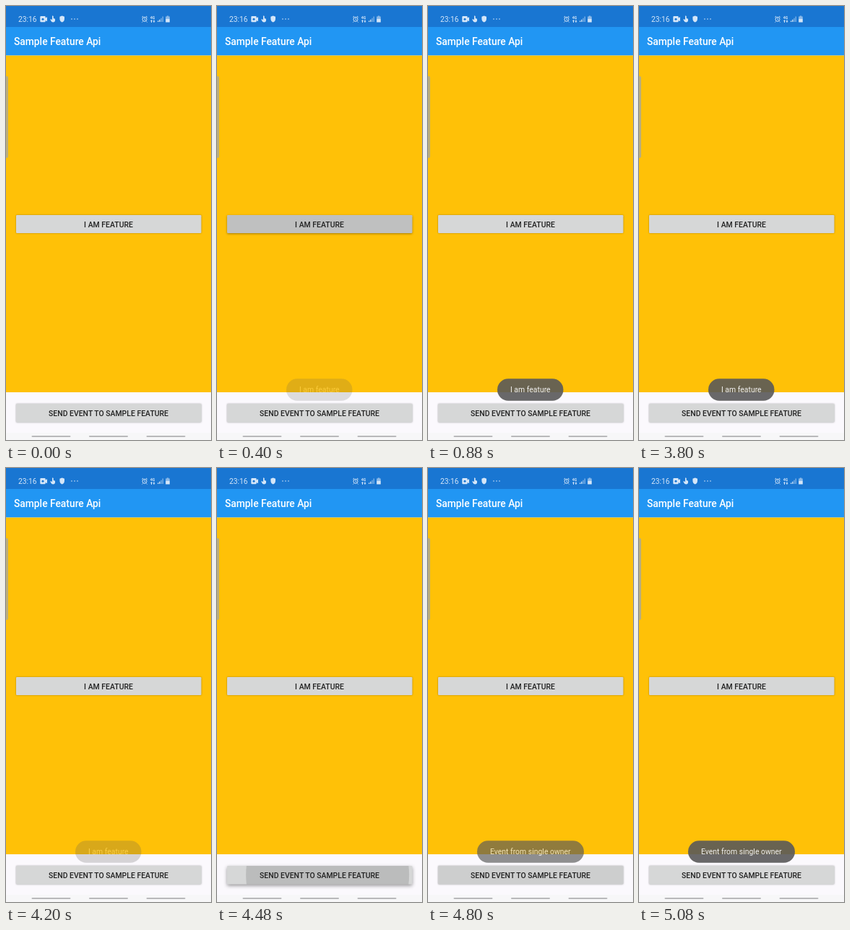
Write an HTML page that moves like this. It is 284 by 600 pixels and loops after 7280 ms.

```html
<!DOCTYPE html>
<html lang="en">
<head>
<meta charset="utf-8">
<title>Sample Feature Api</title>
<style>
html, body { margin: 0; width: 100%; height: 100%; overflow: hidden; }
svg { display: block; width: 284px; height: 600px; font: 10.45px Roboto, sans-serif; }
.label { font-weight: 500; fill: #222; text-anchor: middle; }
.toast rect { fill: #595959; fill-opacity: .9; }
.toast text { fill: #f2f2f2; text-anchor: middle; }
</style>
</head>
<body>
<svg viewBox="0 0 284 600">
  <defs>
    <clipPath id="clip0"><rect x="14" y="289" width="256.5" height="25" rx="1.3"/></clipPath>
    <clipPath id="clip1"><rect x="14" y="550" width="256.5" height="25.5" rx="1.3"/></clipPath>
  </defs>
  <rect width="284" height="600" fill="#fbf9fd"/>
  <rect width="284" height="29" fill="#1976d2"/>
  <rect y="29" width="284" height="39.5" fill="#2196f3"/>
  <rect y="68.5" width="284" height="465.5" fill="#ffc107"/>
  <rect y="590" width="284" height="10" fill="#f7f7f8"/>
  <rect x="-3" y="97" width="6" height="113" rx="2" fill="#bbae7b"/>
  <g fill="#b9b9bb">
    <rect x="35.5" y="594" width="54" height="2" rx="1"/>
    <rect x="115" y="594" width="54" height="2" rx="1"/>
    <rect x="194.5" y="594" width="54" height="2" rx="1"/>
  </g>

  <!-- status bar -->
  <g fill="#d5e6f8">
    <text x="17" y="22" font-size="10.3">23:16</text>
    <path d="M48.5 14h5q1.2 0 1.2 1.2v1.3l2.3-1.3v6l-2.3-1.3v1.2q0 1.2-1.2 1.2h-5q-1.2 0-1.2-1.2v-5.900q0-1.200 1.200-1.200z"/>
    <circle cx="51" cy="18.200" r="1.500" fill="#1976d2"/>
    <path d="M64 13.500q1.500-.5 1.700 1v2.500l2.300.8v2.700q-.5 2-2.700 2t-3.300-2.500l-.8-1.500 1.500-.3 1.300 1z"/>
    <path d="M77.700 13.500l3.300 1.200v3q0 3.400-3.300 4.800-3.300-1.400-3.300-4.800v-3z"/>
    <circle cx="91" cy="18" r=".8"/><circle cx="95" cy="18" r=".8"/><circle cx="99" cy="18" r=".8"/>
    <g fill="none" stroke="#d5e6f8">
      <circle cx="192" cy="18.300" r="3"/>
      <path d="M192 16.500v2l1.300.8M188.300 15.500l1.700-1.500M195.700 15.500l-1.700-1.500M189.500 21.500l-1 1M194.500 21.500l1 1"/>
    </g>
    <text x="199.700" y="17.600" font-size="5.200" font-weight="700">4G</text>
    <path d="M201.500 19l1.500 2h-1v2h-1v-2h-1zM205 23l-1.500-2h1v-2h1v2h1z"/>
    <path d="M210 20.500h1.300v1.500h-1.300zM212.200 18.800h1.300v3.200h-1.300z"/>
    <path d="M214.400 16.800h1.300v5.200h-1.300zM216.600 14.500h1.300v7.500h-1.300z" opacity=".55"/>
    <path d="M222.800 13.500h2.400v1h1.600v3h-5.600v-3h1.600z" opacity=".6"/>
    <rect x="221.200" y="17.500" width="5.600" height="5"/>
  </g>
  <text x="11" y="54.300" font-size="13.820" font-weight="500" fill="#fff">Sample Feature Api</text>

  <g class="button">
    <rect x="14" y="289" width="256.5" height="25" rx="1.3" fill="#d6d7d7"/>
    <circle clip-path="url(#clip0)" cy="301.5"/>
    <text class="label" x="142" y="305.500">I AM FEATURE</text>
  </g>
  <g class="button">
    <rect x="14" y="550" width="256.5" height="25.5" rx="1.3" fill="#d6d7d7"/>
    <circle clip-path="url(#clip1)" cy="562.5"/>
    <text class="label" x="142" y="566.500">SEND EVENT TO SAMPLE FEATURE</text>
  </g>

  <g class="toast">
    <rect x="96" y="515.300" width="91.500" height="30.400" rx="15.200"/>
    <text x="141.800" y="534">I am feature</text>
  </g>
  <g class="toast">
    <rect x="68" y="515.300" width="148" height="30.400" rx="15.200"/>
    <text x="141.800" y="534">Event from single owner</text>
  </g>
</svg>
<script>
const LOOP = 7280, STEP = 40;
const buttons = document.querySelectorAll('.button');
const toasts = document.querySelectorAll('.toast');
const taps = [
  { press: 30, release: 345, hide: 3770 },
  { press: 4320, release: 4555, hide: Infinity }
];

const ramp = (t, start, length) => Math.min(1, Math.max(0, (t - start) / length));
const mix = (a, b, p) => a + (b - a) * p;

function drawButton(button, { press, release }, t) {
  const [face, ripple] = button.children;
  const spread = ramp(t, press, 240);
  ripple.setAttribute('cx', mix(175, 142.2, spread));
  ripple.setAttribute('r', mix(77, 131, spread));
  ripple.setAttribute('opacity', .125 * ramp(t, press, 75) * (1 - ramp(t, release, 370)));
  const lift = ramp(t, press, 110) * (1 - ramp(t, release, 110));
  face.style.filter = `drop-shadow(0 ${mix(.8, 2.2, lift)}px ${mix(.8, 2.4, lift)}px rgba(0,0,0,${mix(.32, .4, lift)}))`;
}

function drawToast(toast, { release, hide }, t) {
  const shown = 1 - (1 - ramp(t, release, 500)) ** 2;
  const gone = ramp(t, hide, 500) ** 2;
  toast.setAttribute('opacity', shown * (1 - gone));
}

function draw(now) {
  const t = Math.floor(now % LOOP / STEP) * STEP;
  taps.forEach((tap, i) => {
    drawButton(buttons[i], tap, t);
    drawToast(toasts[i], tap, t);
  });
}

const start = performance.now();
function tick() {
  draw(performance.now() - start);
  requestAnimationFrame(tick);
}
tick();
</script>
</body>
</html>
```
